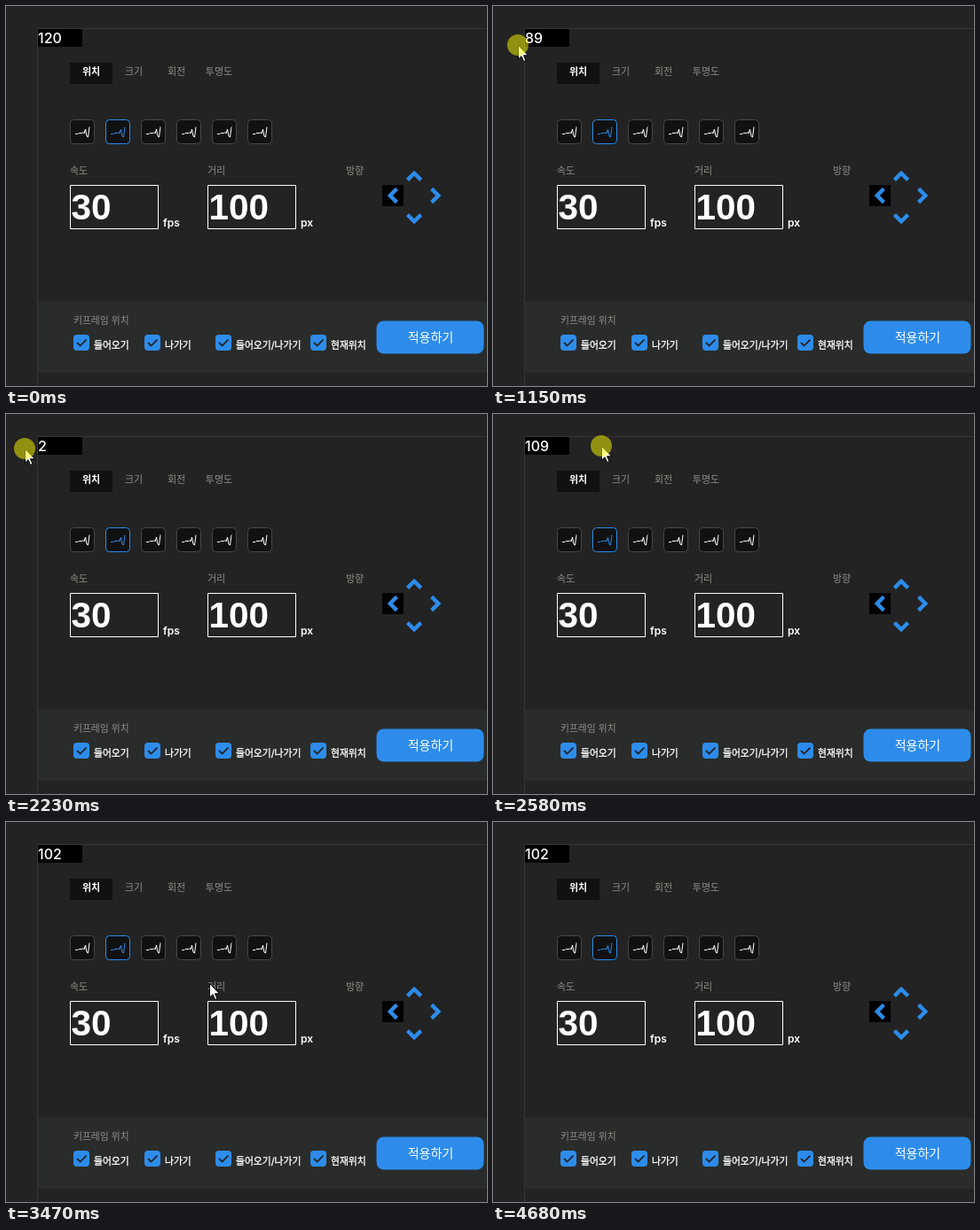
Recreate the animation shown at these times as an HTML page. Size 542x429 px, loop 5020 ms.

```html
<!DOCTYPE html>
<html lang="ko">
<head>
<meta charset="utf-8">
<style>
  html, body { margin: 0; width: 100%; height: 100%; overflow: hidden; background: #232323; }
  svg { display: block; width: 542px; height: 429px; font: 11px Inter, "Noto Sans CJK KR", "Noto Sans CJK", sans-serif; fill: #fff; }
  .dim { fill: #918e88; }
  .mid { text-anchor: middle; }
  .big { font: bold 40.5px "Liberation Sans", Arial, sans-serif; }
  .unit { font-size: 12px; font-weight: 600; }
  .label { font-size: 10.8px; stroke: #fff; stroke-width: .3; }
  .line { fill: none; }
  .blue { fill: #2d8ceb; }
  .pointer { stroke: #000; stroke-width: 1; stroke-linejoin: round; }
  #value { font-size: 16px; font-weight: 500; }
</style>
</head>
<body>
<svg viewBox="0 0 542 429">
  <path class="line" stroke="#363636" d="M35.5 429V25.5H542"/>
  <path fill="#2a2c2b" d="M36 334H542V414H36Z"/>
  <path fill="#000" d="M36 26h50v20h-50zM424 202h24v24h-24z"/>
  <text id="value" x="36" y="42">120</text>

  <path fill="#111" d="M72 64h48v24h-48z"/>
  <g class="mid">
    <text x="96" y="78" font-weight="700">위치</text>
    <g class="dim">
      <text x="144" y="78">크기</text>
      <text x="192" y="78">회전</text>
      <text x="240" y="78">투명도</text>
    </g>
  </g>
  <g id="presets"></g>

  <g class="dim">
    <text x="72" y="190">속도</text>
    <text x="227" y="190">거리</text>
    <text x="383" y="190">방향</text>
    <text x="76" y="359" font-size="10.8">키프레임 위치</text>
  </g>
  <path class="line" stroke="#fff" d="M72.5 202.5h99v49h-99zM227.5 202.5h99v49h-99z"/>
  <text class="big" x="73.5" y="241">30</text>
  <text class="big" x="228.5" y="241">100</text>
  <text class="unit" x="177" y="249">fps</text>
  <text class="unit" x="332" y="249">px</text>
  <g id="arrows" class="line" stroke="#2d8ceb" stroke-width="4.4"></g>

  <g id="checks"></g>
  <rect class="blue" x="417.5" y="355.5" width="121" height="37" rx="8"/>
  <text class="mid" x="478.5" y="379" font-size="14">적용하기</text>

  <g id="cursor">
    <path id="arrow" class="pointer" d="M.5 .5V16L4 12.7 6.6 18.5 9 17.5 6.5 11.8H11.5Z"/>
    <path id="resize" class="pointer" d="M-10.5 0L-5.5 -4.5V-1.5H-1V-4.5H1V-1.5H5.5V-4.5L10.5 0 5.5 4.5V1.5H1V4.5H-1V1.5H-5.5V4.5Z"/>
    <g id="hand" class="pointer">
      <path d="M-1.5 14V2Q-1.5 .5 0 .5T1.5 2V7.5Q3 6.3 4.5 8 6 7 7.3 8.7 9.5 8 9.5 10.5V15Q9.5 17 7.5 19V22.5H-2V20L-6.2 13.5Q-7 11.5 -5 11.2 -3.5 11.3 -1.5 14Z"/>
      <path class="line" d="M1.5 8v4M4.5 8.5v3.5M7.3 9v3"/>
    </g>
    <circle id="press" r="12" fill="#ff0" opacity=".5"/>
  </g>
</svg>
<script>
const el = id => document.getElementById(id);
const build = (id, items, draw) => { el(id).innerHTML = items.map(draw).join(''); };

build('presets', [...Array(6).keys()], i => {
  const on = i === 1;
  return `<g class="line" transform="translate(${72 + 40 * i} 128)">
    <rect x=".5" y=".5" width="27" height="27" rx="4" fill="#111" stroke="${on ? '#2d8ceb' : '#484848'}"/>
    <path stroke="${on ? '#2d8ceb' : '#fff'}" d="M6 16.5H9L10 15.5H14L15 14.5 16 16 17.5 11 19 19 20.5 20 22 8.5"/></g>`;
});

build('arrows', [0, 1, 2, 3], i =>
  `<path transform="translate(0 ${i % 2 ? -2 : 0}) rotate(${90 * i} 460 216)" d="M452.4 196.4l7.6 -7.6 7.6 7.6"/>`);

build('checks', [[76, '들어오기'], [156, '나가기'], [236, '들어오기/나가기'], [343, '현재위치']], ([x, name]) =>
  `<rect class="blue" x="${x}" y="371" width="18" height="18" rx="4"/>
   <path class="line" stroke="#222" stroke-width="1.8" d="M${x + 4} 380l3.6 3.6 6.9-6.9"/>
   <text class="label" x="${x + 23}" y="387">${name}</text>`);

const LOOP = 5020, START = 256, TICK = 68, PRESS = 10, RELEASE = 44;
const clamp = (v, min, max) => Math.min(max, Math.max(min, v));
const ease = u => (1 - Math.cos(Math.PI * clamp(u, 0, 1))) / 2;

// Turning points of the drag: tick, x. The hand drifts up meanwhile.
const turns = [[PRESS, 59], [15, 12], [23, 139], [24, 139], [30, 13], [34, 122], [39, 13], [RELEASE, 115]];
const stops = [
  [0, 502, 415], [7, 69, 50],
  ...turns.map(([k, x]) => [k, x, 44 - 8 * ease((k - 24) / 10)]),
  [48, 249, 207], [53, 484, 402], [56, 477, 381], [59, 477, 381], [64, 530, 108]
];

function mouse(tick) {
  const k = clamp(tick, 0, 63.99);
  const i = stops.findIndex(s => s[0] > k), [k0, x0, y0] = stops[i - 1], [k1, x1, y1] = stops[i];
  const u = ease((k - k0) / (k1 - k0));
  return [Math.round(x0 + (x1 - x0) * u), Math.round(y0 + (y1 - y0) * u)];
}

// Each pixel dragged changes the field by one, within its limits
function fieldValue(tick) {
  let value = 120;
  for (let k = PRESS + 1; k <= Math.min(tick, RELEASE); k++)
    value = clamp(value + mouse(k)[0] - mouse(k - 1)[0], 0, 120);
  return value;
}

const within = (x, y, l, t, r, b) => x >= l && x < r && y >= t && y < b;
const show = (id, on) => { el(id).style.display = on ? '' : 'none'; };

function draw() {
  const tick = Math.floor((performance.now() % LOOP - START) / TICK);
  const [x, y] = mouse(tick);
  const onField = within(x, y, 36, 26, 86, 46), onButton = within(x, y, 418, 356, 538, 392);
  el('value').textContent = fieldValue(tick);
  el('cursor').setAttribute('transform', `translate(${x} ${y})`);
  show('cursor', tick >= 0 && tick < 49 || tick >= 53 && tick < 65);
  show('press', tick >= PRESS && tick < RELEASE);
  show('resize', onField);
  show('hand', onButton);
  show('arrow', !onField && !onButton);
  requestAnimationFrame(draw);
}
draw();
</script>
</body>
</html>
```
